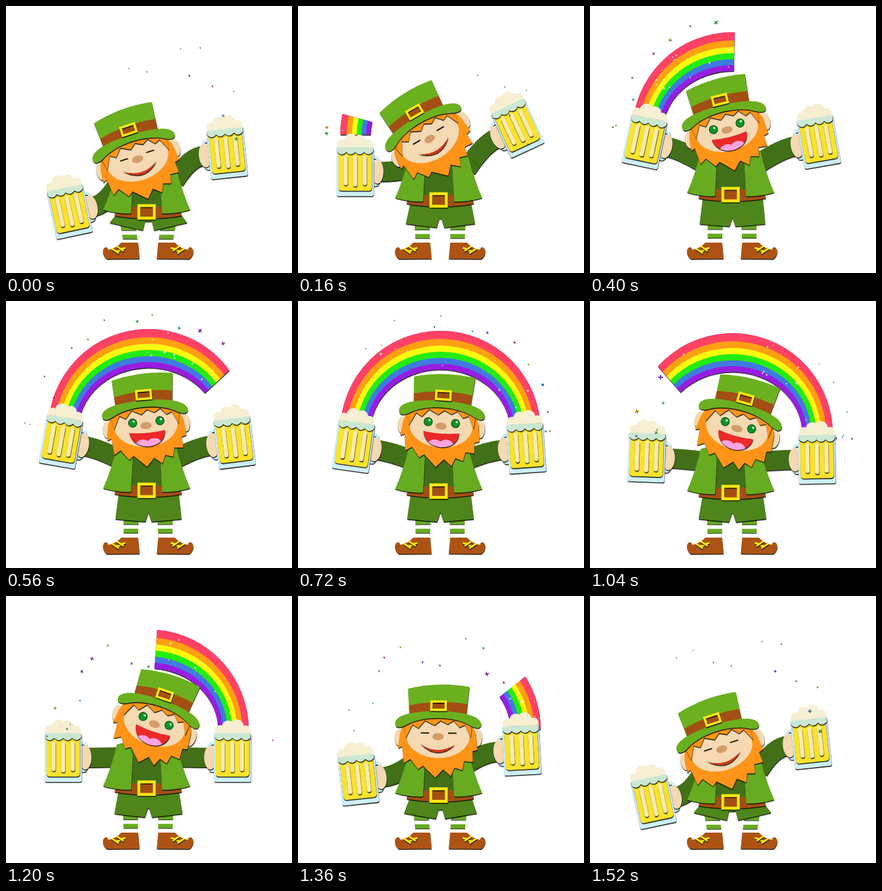
These frames come from a looping animation (480 px wide and 448 px high, 1600 ms). An HTML page with a canvas:

```html
<!DOCTYPE html>
<html lang="en">
<head>
<meta charset="utf-8">
<style>
  html, body { margin: 0; width: 100%; height: 100%; overflow: hidden; background: #fff; }
  canvas { display: block; }
</style>
</head>
<body>
<canvas id="stage" width="480" height="448"></canvas>
<script>
const ctx = document.getElementById('stage').getContext('2d');
const STEP = 80, STEPS = 20, RAD = Math.PI / 180;
const C = {
  lime: '#6bb01f', jacket: '#67ab20', pants: '#4f861b', dark: '#427018',
  brown: '#a34f14', leather: '#ad5314', gold: '#fbe611', skin: '#f4d9b3',
  hair: '#ff9418', ink: '#2a1608', glass: '#cdeff9', beer: '#fae22e',
  cream: '#f6efd2', tint: '#cbe8d2', bar: '#f8ecae'
};
const BANDS = ['#ff4263', '#ff9f12', '#fbf910', '#22ec14', '#3f7ae0', '#981de0'];
const BAND_EDGES = [0, 0.21, 0.38, 0.54, 0.7, 0.85, 1];
const CONFETTI = ['#16b522', '#f0b412', '#20c9d6', '#8a25d8', '#d424b8', '#d6d21a', '#3579dc'];

// Each pose: time step, body drop, head x/y/angle, left mug x/y/angle, right mug x/y/angle, rainbow base
const POSES = [
  [0, 29, 221, 257, -18, 107, 346, -12, 371, 248, -6, 216],
  [2, 9, 221, 223, -30, 96, 279, 0, 369, 206, -25, 216],
  [5, 0, 230, 208, -14, 91, 229, 12, 384, 229, -10, 212],
  [9, 2.5, 240, 210, 4, 93, 245, 8, 383, 248, -4, 218],
  [11, 4, 244, 213, 12, 94, 255, 4, 382, 261, -2, 220],
  [15, 6, 249, 215, 19, 96, 272, 0, 380, 272, 0, 224],
  [19, 29, 221, 257, -18, 107, 346, -12, 371, 248, -6, 224]
];

const clamp = (v, a, b) => Math.max(a, Math.min(b, v));
const noise = n => { const s = Math.sin(n * 127.1 + 31.7) * 43758.5453; return s - Math.floor(s); };

function poseAt(step) {
  let i = 0;
  while (i < POSES.length - 2 && step >= POSES[i + 1][0]) i++;
  const a = POSES[i], b = POSES[i + 1];
  let u = clamp((step - a[0]) / (b[0] - a[0]), 0, 1);
  if (a[0] === 15) u = u * u * (3 - 2 * u);
  return a.map((v, n) => v + (b[n] - v) * u);
}

function shadow(on) {
  ctx.shadowColor = on ? 'rgba(10,10,0,.9)' : 'transparent';
  ctx.shadowOffsetX = 0.4;
  ctx.shadowOffsetY = 1.6;
  ctx.shadowBlur = 1;
}
function paint(color, path, raised = true) {
  shadow(raised);
  ctx.fillStyle = color;
  ctx.beginPath();
  path();
  ctx.fill();
}
function line(color, width, path, raised = false) {
  shadow(raised);
  ctx.strokeStyle = color;
  ctx.lineWidth = width;
  ctx.beginPath();
  path();
  ctx.stroke();
}
const poly = (color, pts, raised) => paint(color, () => {
  pts.forEach(p => ctx.lineTo(p[0], p[1]));
  ctx.closePath();
}, raised);
const oval = (color, x, y, rx, ry, raised) =>
  paint(color, () => ctx.ellipse(x, y, rx, ry, 0, 0, 7), raised);
const box = (color, x, y, w, h, r, raised) =>
  paint(color, () => ctx.roundRect(x, y, w, h, r), raised);

function placed(x, y, deg, flip, draw) {
  ctx.save();
  ctx.translate(x, y);
  ctx.rotate(deg * RAD);
  ctx.scale(flip, 1);
  draw();
  ctx.restore();
}
function bothSides(axis, draw) {
  for (const side of [1, -1]) placed(axis, 0, 0, side, draw);
}

const revealAngle = step => step < 1.6 ? 0 : clamp(12 + 26.4 * (step - 2), 0, 180);
const hideAngle = step => clamp(95 + 26.5 * (step - 15), 0, 180);
function arcPoint(deg, depth, baseY) {
  const a = deg * RAD;
  return [239 - (168 - 51 * depth) * Math.cos(a), baseY - (168 - 65 * depth) * Math.sin(a)];
}

function rainbow(step, baseY) {
  const from = hideAngle(step), to = revealAngle(step);
  if (to <= from) return;
  const band = (color, d0, d1, raised) => paint(color, () => {
    const a = (180 + from) * RAD, b = (180 + to) * RAD;
    ctx.ellipse(239, baseY, 168 - 51 * d0, 168 - 65 * d0, 0, a, b);
    ctx.ellipse(239, baseY, 168 - 51 * d1, 168 - 65 * d1, 0, b, a, true);
    ctx.closePath();
  }, raised);
  band(BANDS[5], 0, 1, true);
  BANDS.forEach((c, i) => band(c, BAND_EDGES[i], Math.min(1, BAND_EDGES[i + 1] + 0.01), false));
}

function legs(drop) {
  bothSides(238.5, () => {
    const knee = -28 - drop * 0.24;
    ctx.save();
    ctx.beginPath();
    [[knee - 13, 360], [knee + 13, 360], [-17, 399], [-41, 399]].forEach(p => ctx.lineTo(...p));
    ctx.clip();
    shadow(false);
    const lift = drop * 0.06;
    ctx.fillStyle = '#fff';
    ctx.fillRect(-90, 360, 90, 40);
    for (const [y, h] of [[358, 16.5 + lift], [382 + lift, 7]]) {
      ctx.fillStyle = C.jacket;
      ctx.fillRect(-90, y, 90, h);
      ctx.fillStyle = '#1d3510';
      ctx.fillRect(-90, y + h, 90, 1.2);
    }
    ctx.restore();
    paint(C.leather, () => {
      ctx.moveTo(-45, 397);
      ctx.lineTo(-17, 397);
      ctx.lineTo(-14.5, 424);
      ctx.lineTo(-69, 424.5);
      ctx.bezierCurveTo(-75, 421, -79, 409, -72, 405);
      ctx.quadraticCurveTo(-68, 404, -67, 409);
      ctx.quadraticCurveTo(-54, 407, -45, 397);
    });
    ctx.lineCap = 'butt';
    for (const [x, y] of [[-61, 407], [-53, 403]])
      line(C.gold, 3, () => {
        ctx.moveTo(x, y);
        ctx.lineTo(x + 12, y + 8);
        ctx.moveTo(x + 6, y + 5);
        ctx.lineTo(x + 15, y + 3);
      }, true);
  });
}

function buckle(x, y, w, h, t) {
  paint(C.gold, () => {
    ctx.rect(x - w / 2, y - h / 2, w, h);
    ctx.rect(x + w / 2 - t, y - h / 2 + t, 2 * t - w, h - 2 * t);
  });
}

function body(drop) {
  const hem = 370 + drop * 0.22, half = 55 + drop * 0.35, side = hem - 4 - drop * 0.3;
  poly(C.pants, [
    [190, 315 + drop], [239 - half, side], [234 - drop * 0.15, hem], [239 - drop * 0.2, hem - 15],
    [239 + drop * 0.2, hem - 15], [244 + drop * 0.15, hem], [239 + half, side], [289, 315 + drop]
  ]);
  ctx.save();
  ctx.translate(0, drop);
  poly(C.dark, [[207, 245], [265, 245], [270, 312], [204, 312]], false);
  paint(C.brown, () => {
    ctx.moveTo(187, 307);
    ctx.quadraticCurveTo(238, 311, 291, 306);
    ctx.lineTo(295, 323);
    ctx.quadraticCurveTo(238, 332, 182, 323);
    ctx.closePath();
  });
  bothSides(236, () => paint(C.jacket, () => {
    ctx.moveTo(-50, 243);
    ctx.quadraticCurveTo(-60, 285, -73, 313);
    ctx.quadraticCurveTo(-50, 320, -26, 319);
    ctx.lineTo(-23, 262);
    ctx.lineTo(-30, 238);
    ctx.closePath();
  }));
  buckle(236, 316.5, 31, 26, 5);
  ctx.restore();
}

function arm(x, y, deg, side, drop) {
  const c = Math.cos(deg * RAD) * side, s = Math.sin(deg * RAD) * side;
  ctx.lineCap = 'butt';
  line(C.dark, 33, () => {
    ctx.moveTo(x + 40 * c, y + 40 * s - 1);
    ctx.quadraticCurveTo(x + 64 * c, y + 64 * s - 1, 237 - side * 46, 264 + drop);
  }, true);
}

function mug(x, y, deg, side) {
  placed(x, y, deg, side, () => {
    line(C.glass, 5, () => ctx.roundRect(22, -25, 16, 46, 4), true);
    oval(C.skin, 37, -1, 10.5, 20);
    box(C.glass, -31, -41, 62, 81, 3);
    box(C.beer, -28, -38, 56, 69, 5);
    for (const bx of [-16, 0, 16]) box(C.bar, bx - 3.5, -28, 7, bx ? 50 : 52, 3.5);
    paint(C.tint, () => {
      ctx.moveTo(-31, -42);
      ctx.lineTo(30, -42);
      ctx.lineTo(30, -35);
      for (let i = 0; i < 4; i++) {
        const sx = 30 - i * 15;
        ctx.quadraticCurveTo(sx - 7.5, -26, sx - 15, -34);
      }
      ctx.closePath();
    });
    paint(C.cream, () => {
      ctx.moveTo(-30, -42);
      ctx.bezierCurveTo(-33, -52, -25, -57, -19, -54);
      ctx.bezierCurveTo(-18, -65, -4, -68, 1, -61);
      ctx.bezierCurveTo(8, -66, 17, -61, 17, -55);
      ctx.bezierCurveTo(27, -57, 31, -49, 29, -42);
      ctx.closePath();
    }, false);
  });
}

function face(open) {
  oval(C.skin, 0, -1, 53, 37, false);
  for (const x of [-22, 24]) {
    if (open) {
      oval('#124d12', x, -6, 7.6, 7.6, false);
      oval('#0c9427', x, -6, 6.5, 6.5, false);
      oval('#d8ffe0', x + 2, -8.5, 1.9, 1.9, false);
    } else {
      line(C.ink, 2.2, () => { ctx.moveTo(x - 7, -6); ctx.lineTo(x + 7, -6); });
    }
  }
  oval('#d39d68', 0, 0, 9.5, 6, false);
  if (open) {
    const mouth = () => {
      ctx.moveTo(-29, 10);
      ctx.quadraticCurveTo(0, 15, 31, 10);
      ctx.bezierCurveTo(31, 43, -25, 44, -29, 10);
    };
    paint('#ec2929', mouth);
    ctx.save();
    ctx.beginPath();
    mouth();
    ctx.clip();
    oval('#ffa4df', -8, 32, 12, 9, false);
    oval('#ffa4df', 11, 31, 12, 9, false);
    ctx.restore();
  } else {
    paint('#d13a1c', () => {
      ctx.moveTo(-30, 12);
      ctx.quadraticCurveTo(-2, 32, 29, 13);
      ctx.quadraticCurveTo(0, 41, -30, 12);
    });
  }
}

function hat() {
  paint(C.lime, () => {
    ctx.moveTo(-51, -80);
    ctx.quadraticCurveTo(0, -93, 52, -84);
    ctx.lineTo(47, -32);
    ctx.lineTo(-48, -32);
    ctx.closePath();
  });
  paint(C.brown, () => {
    ctx.moveTo(-49, -52);
    ctx.quadraticCurveTo(0, -63, 49, -55);
    ctx.lineTo(47, -32);
    ctx.lineTo(-48, -32);
    ctx.closePath();
  }, false);
  paint(C.lime, () => {
    ctx.moveTo(-72, -24);
    ctx.bezierCurveTo(-68, -37, -42, -42, 0, -43);
    ctx.bezierCurveTo(42, -42, 68, -36, 72, -23);
    ctx.bezierCurveTo(73, -13, 64, -13, 52, -20);
    ctx.bezierCurveTo(25, -35, -25, -35, -52, -20);
    ctx.bezierCurveTo(-64, -13, -73, -13, -72, -24);
  });
  buckle(0.5, -52, 28, 18, 4);
}

function head(x, y, deg, open) {
  placed(x, y, deg, 1, () => {
    oval(C.skin, -65, 2, 8, 14);
    oval(C.skin, 66, 1, 8, 15);
    poly(C.hair, [
      [-58, -24], [-64, -4], [-67, 20], [-60, 17], [-57, 45], [-46, 38], [-33, 55], [-25, 49],
      [-4, 69], [9, 55], [22, 66], [28, 52], [41, 56], [44, 41],
      [59, 42], [58, 24], [66, 22], [63, -6], [56, -24], [0, -36]
    ]);
    face(open);
    poly(C.hair, [
      [-58, -20], [-54, 2], [-43, -20], [-33, -14], [-22, -27], [-6, -19], [4, -27],
      [16, -21], [26, -27], [36, -16], [45, -20], [55, 1], [57, -22], [0, -38]
    ]);
    hat();
  });
}

function star(x, y, size, color, turn) {
  line(color, Math.max(0.8, size * 0.35), () => {
    for (let i = 0; i < 2; i++) {
      const a = turn + i * Math.PI / 2, dx = Math.cos(a) * size, dy = Math.sin(a) * size;
      ctx.moveTo(x - dx, y - dy);
      ctx.lineTo(x + dx, y + dy);
    }
  });
}

// Pieces fly off the rainbow's moving end and drift away from it.
function confetti(step, baseY) {
  const count = 36, life = 6;
  for (let i = 0; i < count; i++) {
    const born = 1.2 + i / count * 17.5, age = (step - born + STEPS) % STEPS;
    if (age > life) continue;
    const r = n => noise(i * 7 + n);
    const hiding = born > 10;
    const deg = hiding ? hideAngle(born) : revealAngle(born);
    const [x, y] = arcPoint(deg, hiding ? r(2) : -0.15 - 0.4 * r(2), baseY);
    const px = x + (r(3) - 0.5) * 10 * age, py = y + (r(4) - 0.6) * 8 * age + 0.3 * age * age;
    const size = (1 - age / life) * (1 + 2.8 * r(5)) + 0.5;
    star(px + 0.5, py + 0.8, size, '#222', r(6) * 6 + age);
    star(px, py, size, CONFETTI[i % CONFETTI.length], r(6) * 6 + age);
  }
}

function glints(step, baseY) {
  const from = hideAngle(step), to = revealAngle(step);
  for (let i = 0; i < 24; i++) {
    const r = n => noise(i * 13 + n + step * 5.3);
    const deg = to < 180 ? to - r(1) * 60 : from + r(1) * 170;
    if (deg < from + 2 || deg > to - 2 || r(2) < 0.4) continue;
    const [x, y] = arcPoint(deg, 0.05 + 0.85 * r(3), baseY);
    star(x, y, 0.8 + r(4) ** 2 * 2.4, '#fff', 0);
  }
}

function draw(step) {
  const [, drop, hx, hy, ha, lx, ly, la, rx, ry, ra, baseY] = poseAt(step);
  shadow(false);
  ctx.fillStyle = '#fff';
  ctx.fillRect(0, 0, 480, 448);
  rainbow(step, baseY);
  glints(step, baseY);
  arm(lx, ly, la, 1, drop);
  arm(rx, ry, ra, -1, drop);
  legs(drop);
  body(drop);
  head(hx, hy, ha, step >= 4 && step <= 16);
  mug(lx, ly, la, 1);
  mug(rx, ry, ra, -1);
  confetti(step, baseY);
}

const start = performance.now();
function tick() {
  draw(Math.floor((performance.now() - start) / STEP) % STEPS);
  requestAnimationFrame(tick);
}
tick();
</script>
</body>
</html>
```
